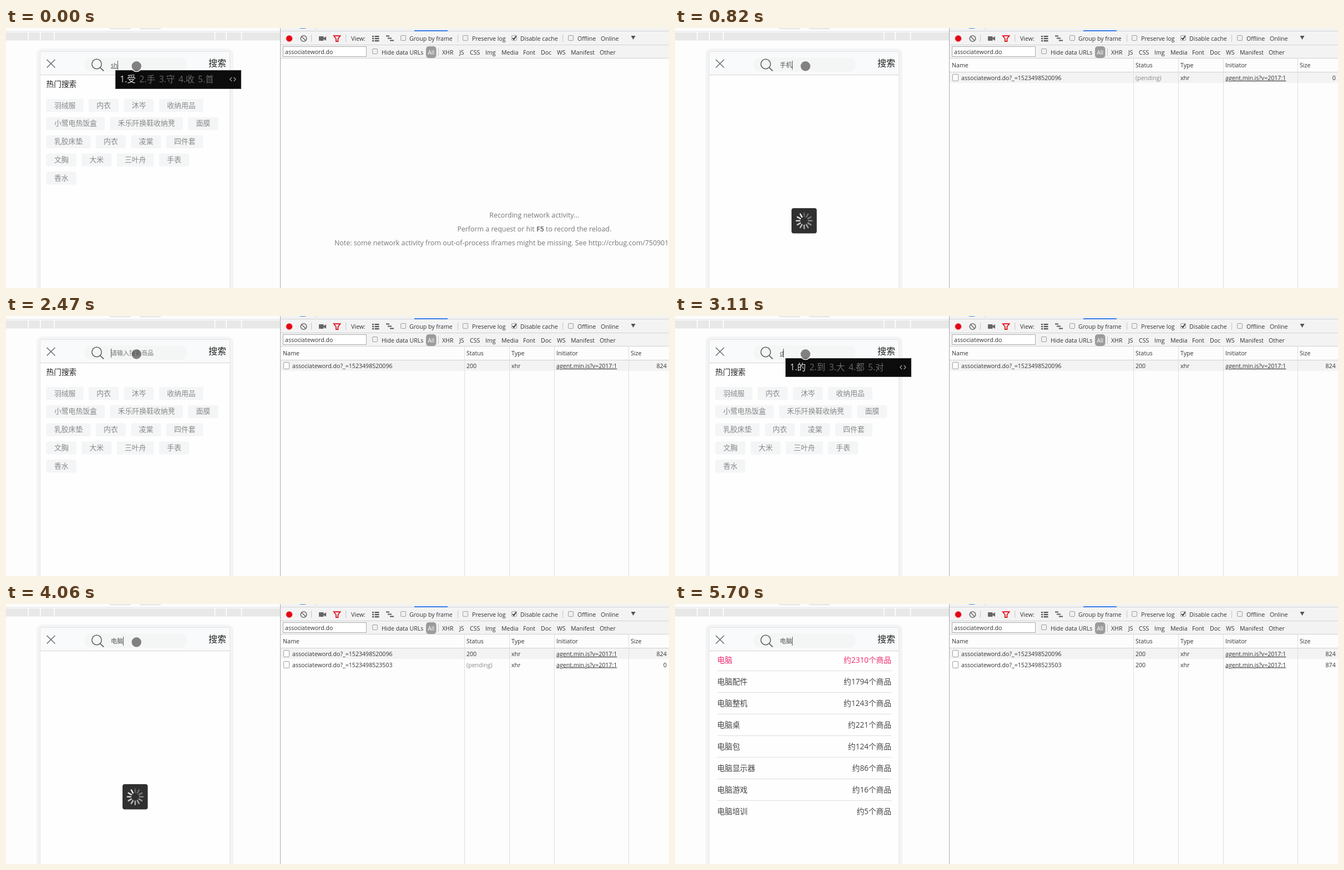
An HTML page for the animation above (5850 ms loop, 1195 px wide and 469 px high).

```html
<!DOCTYPE html>
<html lang="zh-CN">
<head>
<meta charset="utf-8">
<style>
html, body { margin: 0; width: 100%; height: 100%; overflow: hidden; background: #fdfdfd; }
svg { display: block; width: 100vw; height: 100vh; }
text { font-family: "Open Sans", "Noto Sans CJK SC", "Noto Sans CJK", sans-serif; white-space: pre; }
</style>
</head>
<body>
<svg viewBox="0 0 1195 469"><g id="base"></g><g id="live"></g></svg>
<script>
const LOOP = 5850;
const $ = id => document.getElementById(id);

const text = (x, y, s, size = 10.6, fill = '#333', more = '') =>
  `<text x="${x}" y="${y}" font-size="${size}" fill="${fill}" ${more}>${s}</text>`;
const rect = (x, y, w, h, fill, r = 0, more = '') =>
  `<rect x="${x}" y="${y}" width="${w}" height="${h}" fill="${fill}" rx="${r}" ${more}/>`;
const path = (d, stroke, width = 1, more = 'fill="none"') =>
  `<path d="${d}" stroke="${stroke}" stroke-width="${width}" ${more}/>`;
const circle = (x, y, r, more) => `<circle cx="${x}" cy="${y}" r="${r}" ${more}/>`;
const box = (x, y, w = 9, h = 9, fill = '#f0f0f0') => rect(x + .5, y + .5, w, h, fill, 1.5, 'stroke="#a0a0a0"');
const END = 'text-anchor="end"', MID = 'text-anchor="middle"';

function ruler() {
  return path('M0 6H494', '#dcdcdc') + rect(0, 8, 494, 14.5, '#e8e8e8') +
    [40, 62, 87, 376.5, 397, 424.5].map(x => rect(x - .75, 8, 1.5, 14.5, '#fff')).join('') +
    [187, 241].map(x => path(`M${x} 0Q${x + 1} 1.5 ${x + 5} 1.5H${x + 34}Q${x + 38} 1.5 ${x + 38} 0`, '#d0d0d0')).join('');
}

function phone() {
  return rect(55, 37, 355, 460, '#f4f4f4', 11) +
    rect(61.5, 42.5, 342, 450, '#fefefe', 2, 'stroke="#e3e3e3"') +
    rect(62, 43, 341, 41, '#f9fafb') + path('M62 84.5H403', '#d3d3d3') +
    path('M73.5 57L88.5 71.5M88.5 57L73.5 71.5', '#666', 1.4) +
    rect(141, 53, 185, 26, '#f4f5f5', 13) +
    circle(163.5, 65, 8.7, 'fill="none" stroke="#666" stroke-width="1.6"') +
    path('M169.8 71.3L176 77.5', '#666', 1.8) +
    text(365, 69, '搜索', 16, '#222');
}

function devtools() {
  const labels = [[622, 'View:'], [727, 'Group by frame'], [840, 'Preserve log'], [927, 'Disable cache'], [1030, 'Offline'], [1072, 'Online']];
  const types = [[677, 'Hide data URLs'], [786, 'XHR'], [817, 'JS'], [836, 'CSS'], [864, 'Img'], [893, 'Media'],
    [932, 'Font'], [964, 'Doc'], [993, 'WS'], [1018, 'Manifest'], [1070, 'Other']];
  return rect(495, 0, 700, 54, '#f3f3f3') +
    path('M495 5.5H1195M495 30.5H1195M495 54.5H1195', '#d2d2d2') +
    path('M494.5 0V469', '#ababab') +
    rect(736, 4, 60, 2, '#3b7de9') + path('M529 0Q535 1.5 541 0', '#3b7de9') + path('M559.5 0V3', '#ccc') +
    circle(510.5, 19, 5.8, 'fill="#e30613" stroke="#f3a5a5" stroke-width=".8"') +
    circle(536.5, 19, 5.3, 'fill="none" stroke="#6a6a6a" stroke-width="1.6"') + path('M532.8 15.3L540.2 22.7', '#6a6a6a', 1.6) +
    path('M564 15H572.5V18L577 15V23L572.5 20V23H564Z', 'none', 0, 'fill="#666"') +
    path('M590.8 14.2H602.5L598.5 19V24.2H594.8V19Z', '#e30613', 1.7) +
    [14, 18, 22].map(y => rect(660, y, 3, 2.3, '#555') + rect(664.5, y, 8, 2.3, '#555')).join('') +
    path('M685 14.5H691M688 18.5H695M692 22.5H699', '#555', 1.8) +
    path('M550.5 12V25M612.5 12V25M814.5 12V25M1003.5 12V25M779.5 36V51', '#c4c4c4') +
    [711, 823, 911, 1013].map(x => box(x, 13)).join('') + path('M913 18L915.3 20.5L919.5 14.5', '#333', 1.8) +
    path('M1126.5 14H1134.5L1130.5 21Z', 'none', 0, 'fill="#555"') +
    labels.map(([x, s]) => text(x, 23, s)).join('') +
    rect(499.5, 33.5, 150, 18, '#fff', 0, 'stroke="#ababab"') + text(503, 47, 'associateword.do') +
    box(660, 37) + rect(757, 33, 18.5, 21, '#9b9b9b', 5) + text(766.2, 48, 'All', 10.6, '#fff', MID) +
    types.map(([x, s]) => text(x, 48, s)).join('');
}

const hint = text(952.3, 342, 'Recording network activity…', 12.4, '#777', MID) +
  text(952.3, 367, 'Perform a request or hit <tspan font-weight="700">F5</tspan> to record the reload.', 12.4, '#777', MID) +
  text(592, 392, 'Note: some network activity from out-of-process iframes might be missing. See http://crbug.com/750901', 12.4, '#777');

function table(rows) {
  if (!rows.length) return hint;
  const heads = [[499, 'Name'], [830, 'Status'], [911, 'Type'], [992, 'Initiator'], [1126, 'Size']];
  return rect(495, 55, 700, 414, '#fdfdfd') + rect(495, 80, 700, 19, '#f3f3f3') +
    path('M495 79.5H1195', '#d0d0d0') + path('M826.5 55V469M907.5 55V469M988.5 55V469M1122.5 55V469', '#dedede') +
    heads.map(([x, s]) => text(x, 71, s)).join('') +
    rows.map(([id, size], i) => {
      const y = 94 + i * 19.5;
      return box(500, Math.round(y) - 11, 10, 12, '#fff') + text(516, y, 'associateword.do?_=' + id) +
        (size ? text(830, y, '200') : text(830, y, '(pending)', 10.6, '#888')) + text(911, y, 'xhr') +
        text(992, y, 'agent.min.js?v=2017:1', 10.6, '#333', 'text-decoration="underline"') +
        text(1190.7, y, size, 10.6, '#333', END);
    }).join('');
}

const tags = ['羽绒服 内衣 沐岑 收纳用品', '小鹭电热饭盒 禾乐阡换鞋收纳凳 面膜', '乳胶床垫 内衣 凌棠 四件套', '文胸 大米 三叶舟 手表', '香水'];
function hotTags() {
  let out = text(72.5, 106, '热门搜索', 13.7, '#222');
  tags.forEach((row, i) => {
    let x = 72.7;
    for (const s of row.split(' ')) {
      const w = s.length * 12.85 + 28.3, y = 128 + i * 32.75;
      out += rect(x, y, w, 23.5, '#f4f5f6', 3) + text(x + 14.2, y + 15.7, s, 12.85, '#888');
      x += w + 9.5;
    }
  });
  return out;
}

function results(word, items) {
  return items.map(([tail, n], i) => {
    const y = 106.3 + i * 38.95, fill = i ? '#444' : '#ee2a70';
    return (i ? path(`M76 ${Math.round(y - 24) - .5}H390`, '#dedede', 1.2) : '') +
      text(76, y, word + tail, 13.7, fill) + text(390, y, `约${n}个商品`, 13.7, fill, END);
  }).join('');
}

function spinner() {
  let out = rect(210, 325, 45.5, 45.5, '#303030', 4);
  for (let i = 0; i < 12; i++)
    out += path('M0 -8V-14', '#fff', 2.6,
      `stroke-linecap="round" opacity="${.9 - i * .06}" transform="translate(232.8 347.8) rotate(${-30 - i * 30})"`);
  return out;
}

function popup(x, words) {
  if (!words) return '';
  const list = words.split(' '), w = 227 + (list.join('').length - 5) * 16, r = x + w;
  let tx = x + 8.3, out = rect(x + .5, 76.5, w - 1, 33, '#0c0c0c', 0, 'stroke="#3c3c3c"');
  list.forEach((s, i) => {
    out += text(tx, 98, `${i + 1}.${s}`, 15.5, i ? '#686868' : '#e0e0e0');
    tx += 19.2 + s.length * 16;
  });
  return out + path(`M${r - 17} 89L${r - 20.5} 92.5L${r - 17} 96M${r - 13.5} 89L${r - 10} 92.5L${r - 13.5} 96`, '#aaa', 1.1);
}

const hot = hotTags(), loading = spinner();
const phones = results('手机', [['', 1688], ['通讯', 336], ['电池', 14], ['卡', 12], ['配件', 9], ['套', 5], ['袋', 3]]);
const computers = results('电脑', [['', 2310], ['配件', 1794], ['整机', 1243], ['桌', 221], ['包', 124], ['显示器', 86], ['游戏', 16], ['培训', 5]]);
const first = '1523498520096', second = '1523498523503';

// Tracks of [start ms, value]
const typed = [[0, 'sh'], [120, 'shou'], [400, 'shouji'], [550, '手机'], [1920, '手'], [2040, ''], [3110, 'd'], [3240, 'di'],
  [3390, 'dian'], [3540, 'diann'], [3660, 'diannao'], [3810, '电脑']];
const words = [[0, '受 手 守 收 首'], [400, '手机 手记 收集 首级 受'], [550, ''], [3110, '的 到 大 都 对'], [3240, '地 第 点 低 底'],
  [3390, '点 店 电 垫 典'], [3540, '电脑 电能 点呢 点 店'], [3660, '电脑 点 店 电 垫'], [3810, '']];
const caret = [[0, 1], [940, 0], [1530, 1], [2040, 0], [2160, 1], [2740, 0], [3110, 1], [4360, 0], [4900, 1], [5300, 0], [5700, 1]];
const panel = [[0, hot], [820, loading], [940, phones], [2470, hot], [4060, loading], [4210, computers]];
const network = [[0, []], [820, [[first, 0]]], [940, [[first, 824]]], [4060, [[first, 824], [second, 0]]], [4210, [[first, 824], [second, 874]]]];
const pointer = [[0, 1], [4780, 0]];
const at = (track, t) => track.findLast(k => k[0] <= t)[1];

let shown = '';
function draw(now) {
  const t = now % LOOP, value = at(typed, t), list = at(words, t);
  const line = list ? 'text-decoration="underline"' : '';
  const html = at(panel, t) + table(at(network, t)) +
    text(189, 71, value || '请输入搜索商品', 11, value ? '#555' : '#777', 'id="field" ' + line) +
    (at(caret, t) ? rect(189, 59, 1, 16, '#555', 0, 'id="caret"') : '') +
    popup(t < 2000 ? 197 : 199, list) +
    (at(pointer, t) ? circle(235.2, 68.8, 9.6, 'fill="#4a4a4a" fill-opacity=".68" stroke="#fff" stroke-opacity=".85" stroke-width="1.8"') : '');
  if (html !== shown) {
    $('live').innerHTML = shown = html;
    if ($('caret') && value) $('caret').setAttribute('x', Math.round(188.5 + $('field').getComputedTextLength()));
  }
  requestAnimationFrame(draw);
}

$('base').innerHTML = ruler() + phone() + devtools();
draw(0);
</script>
</body>
</html>
```
